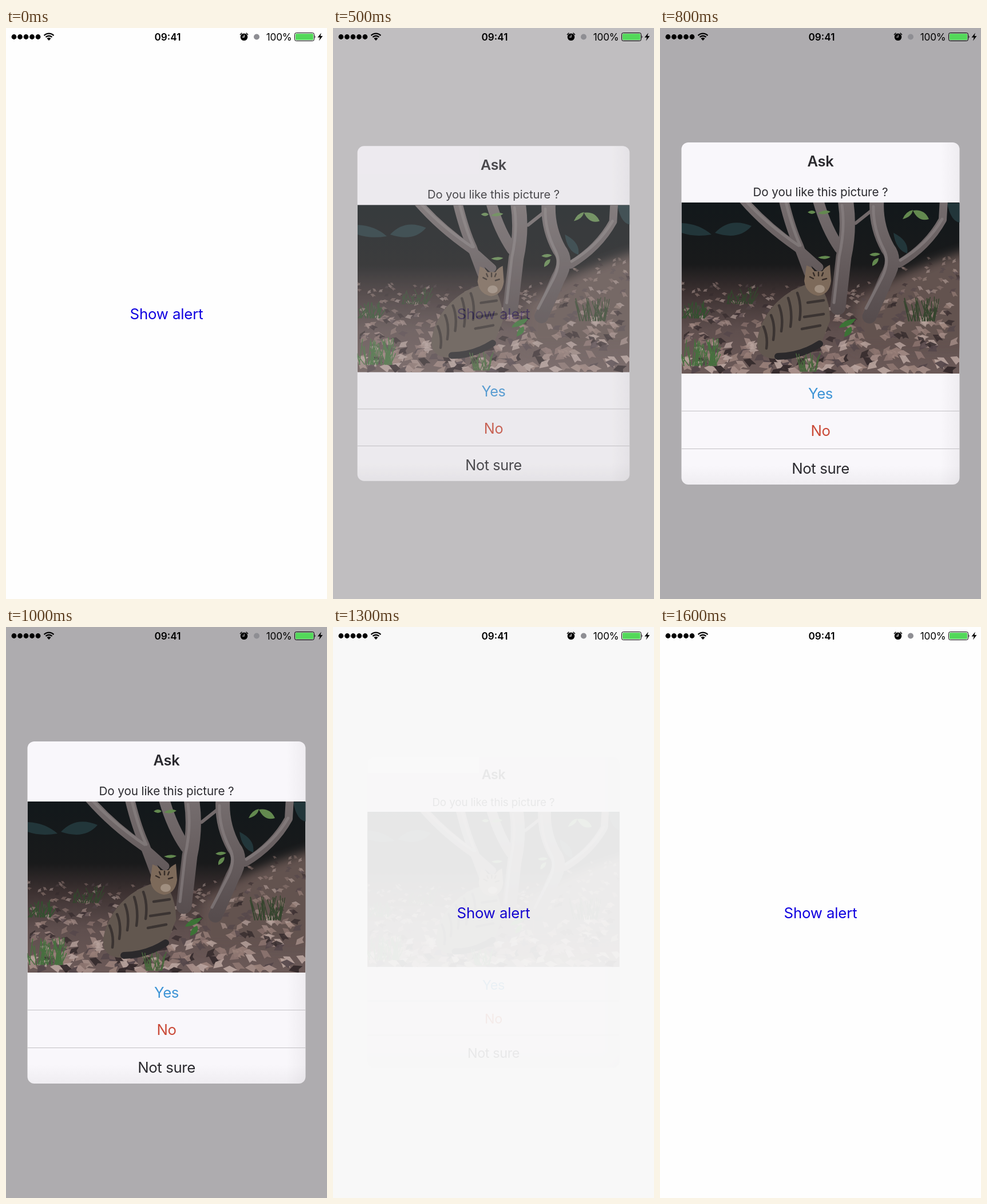
Animation of 561 by 998 pixels, one loop 2000 ms. Source, as an HTML page:

```html
<!DOCTYPE html>
<html lang="en">
<head>
<meta charset="utf-8">
<title>Alert</title>
<style>
  html, body { margin: 0; width: 100%; height: 100%; overflow: hidden; background: #fefefe; }
  svg { display: block; width: 100vw; height: 100vh; }
  text { font-family: Inter, Roboto, "Liberation Sans", sans-serif; }
  .action { font-size: 25.8px; letter-spacing: -.15px; text-anchor: middle; }
  #card .action { letter-spacing: -.4px; }
  .bar { font-size: 17.2px; }
  .line { fill: none; stroke-linecap: round; stroke-linejoin: round; }
</style>
</head>
<body>
<svg viewBox="0 0 561 998">
  <defs>
    <clipPath id="frame"><rect x="37.5" y="305" width="486" height="299"/></clipPath>
    <linearGradient id="scene" x1="0" y1="0" x2="0" y2="1">
      <stop offset="0" stop-color="#12181b"/>
      <stop offset=".36" stop-color="#191a1b"/>
      <stop offset=".52" stop-color="#3b3030"/>
      <stop offset=".75" stop-color="#5f4f4e"/>
      <stop offset="1" stop-color="#6c5a58"/>
    </linearGradient>
    <linearGradient id="bark" gradientUnits="userSpaceOnUse" x1="0" y1="305" x2="0" y2="510">
      <stop offset="0" stop-color="#756d6e"/>
      <stop offset="1" stop-color="#564c4d"/>
    </linearGradient>
    <linearGradient id="shade">
      <stop offset="0" stop-color="#1a141c" stop-opacity="0"/>
      <stop offset="1" stop-color="#1a141c" stop-opacity=".045"/>
    </linearGradient>
    <linearGradient id="shadeDown" href="#shade" x2="0" y2="1"/>
    <filter id="soft" x="-20%" y="-20%" width="140%" height="140%"><feGaussianBlur stdDeviation="9"/></filter>
    <mask id="clockFace">
      <rect x="405" y="5" width="22" height="22" fill="#fff"/>
      <path d="M416.2 12V15.9H413.4" class="line" stroke="#000" stroke-width="1.2"/>
    </mask>
  </defs>

  <rect width="561" height="998" fill="#fefefe"/>
  <text class="action" x="280.5" y="508.8" fill="#1000e0">Show alert</text>
  <rect id="dim" width="561" height="998" fill="#0c040e"/>

  <g id="card">
    <rect x="37.5" y="200" width="486" height="598" rx="12" fill="#f9f7fb"/>
    <path d="M490 200H511.5A12 12 0 0 1 523.5 212V786A12 12 0 0 1 511.5 798H490Z" fill="url(#shade)"/>
    <path d="M37.5 765H523.5V786A12 12 0 0 1 511.5 798H49.5A12 12 0 0 1 37.5 786Z" fill="url(#shadeDown)"/>
    <g fill="#2b2a2f" text-anchor="middle">
      <text x="280.5" y="242.3" font-size="25.5" font-weight="600" letter-spacing="-.3">Ask</text>
      <text x="280.5" y="293.5" font-size="20.7" letter-spacing="-.1">Do you like this picture ?</text>
    </g>
    <g clip-path="url(#frame)">
      <rect x="37.5" y="305" width="486" height="299" fill="url(#scene)"/>
      <path d="M340 480Q450 410 550 385V560H340Z" fill="#63524f" filter="url(#soft)"/>
      <g fill="#22363a">
        <path d="M38 341Q68 342 90 361Q60 366 38 358ZM96 358Q122 330 160 346Q138 372 96 358Z"/>
        <path d="M502 306H524V340Q508 338 502 306ZM408 358Q436 372 432 394Q412 388 408 358Z"/>
      </g>
      <g id="litter"></g>
      <g class="line" stroke="url(#bark)">
        <path d="M145 300Q185 346 240 384L278 418" stroke-width="15"/>
        <path d="M216 300Q228 350 242 380L260 428" stroke-width="17"/>
        <path d="M276 300Q290 350 314 385" stroke-width="19"/>
        <path d="M324 300Q332 350 321 400L311 488" stroke-width="27"/>
        <path d="M376 314L342 341" stroke-width="6"/>
        <path d="M379 300Q376 345 398 385Q414 405 396 436L366 504" stroke-width="25"/>
        <path d="M496 300L494 335Q468 382 418 412" stroke-width="14"/>
      </g>
      <g class="line" stroke="#8d8586" stroke-width="5" opacity=".6">
        <path d="M148 300Q187 343 242 380M219 300Q231 350 245 380M318 310Q324 350 313 400L304 480"/>
        <path d="M373 312Q372 350 391 387Q402 408 388 436L360 490M493 334Q468 377 420 406"/>
      </g>
      <g fill="#63894f">
        <path d="M442 319Q462 316 470 334Q452 340 442 319ZM424 334Q430 320 442 318Q440 330 424 334Z"/>
        <path d="M258 322Q266 316 272 322Q266 328 258 322ZM276 324Q288 316 298 321Q288 328 276 324Z"/>
        <path d="M366 396Q376 390 385 395Q374 402 366 396ZM371 416Q370 404 382 402Q382 412 371 416ZM276 401Q288 396 298 400Q288 407 276 401Z"/>
        <path d="M313 524Q318 510 342 508Q336 522 313 524ZM322 540Q322 526 334 522Q340 534 322 540Z" fill="#3c7236"/>
      </g>
      <path d="M258 448C214 460 176 500 170 546C168 570 184 579 206 578L250 573L284 546L297 512Q298 485 286 460Z" fill="#62574f"/>
      <g class="line" stroke="#3b3432" stroke-width="4.5">
        <path d="M240 463Q248 485 244 510M224 472Q232 495 228 522M208 485Q216 505 212 530M194 502Q202 520 198 545M181 522Q189 540 186 560"/>
        <path d="M258 480L286 476M252 505L286 500M248 526L280 520"/>
      </g>
      <path d="M206 574Q245 574 279 552" class="line" stroke="#2b292b" stroke-width="12"/>
      <path d="M252 442L256 415Q266 418 270 425H284Q288 418 297 414L299 442Q296 466 276 468Q255 464 252 442Z" fill="#7d6a5a"/>
      <path d="M262 435L268 438M284 440L291 438M268 428L270 433M277 427V433M285 428L283 433" class="line" stroke="#382e29" stroke-width="2.5"/>
      <ellipse cx="279" cy="456" rx="9" ry="7" fill="#a08f80"/>
      <g id="grass" class="line" stroke-width="1.5"></g>
    </g>
    <path d="M37.5 669.5H523.5M37.5 735.5H523.5" stroke="#c2c0c4"/>
    <text class="action" x="280.5" y="647.5" fill="#3d94d6">Yes</text>
    <text class="action" x="280.5" y="713.3" fill="#ca4a38">No</text>
    <text class="action" x="280.5" y="779" fill="#2b2a2f">Not sure</text>
  </g>

  <g id="status">
    <g id="signal"></g>
    <path d="M75 22L71.5 18.3Q75 15.4 78.5 18.3Z"/>
    <path d="M69.5 16A7.8 7.8 0 0 1 80.5 16M66.6 13.1A11.9 11.9 0 0 1 83.4 13.1" fill="none" stroke="#000" stroke-width="2.4"/>
    <text class="bar" x="282.5" y="21.7" text-anchor="middle" font-weight="600">09:41</text>
    <circle cx="416" cy="15.8" r="6.3" mask="url(#clockFace)"/>
    <path d="M409.4 11.4L412 8.9M420 8.9L422.6 11.4" class="line" stroke="#000" stroke-width="1.4"/>
    <circle cx="438" cy="15.5" r="5" fill="#8e8e93"/>
    <text class="bar" x="454.8" y="21.7" letter-spacing="-.2">100%</text>
    <rect x="504.5" y="8.5" width="34" height="14" rx="2.8" fill="none" stroke="#000"/>
    <rect x="506" y="10" width="31" height="11" rx="1.3" fill="#53d85a"/>
    <path d="M539.7 13Q541.6 15.5 539.7 18Z"/>
    <path d="M551 8.5L544.5 16.5H548.7L547 22.5L553.5 14H549.5Z"/>
  </g>
</svg>
<script>
const LOOP = 2000, STEP = 100, RATE = 0.0183;
const get = id => document.getElementById(id);

function add(parent, tag, attrs) {
  const node = document.createElementNS(parent.namespaceURI, tag);
  for (const name in attrs) node.setAttribute(name, attrs[name]);
  parent.appendChild(node);
}

let seed = 17;
function random(from, to) {
  seed = (seed * 16807) % 2147483647;
  return from + (to - from) * seed / 2147483647;
}

function drawSignal() {
  for (let i = 0; i < 5; i++) add(get("signal"), "circle", { cx: 14 + i * 10.5, cy: 15.5, r: 4.4 });
}

// Leaves grow larger and clearer towards the bottom of the picture.
function drawLeaves() {
  const tones = ["#a58d87", "#8d7570", "#b8a39d", "#9a817a", "#54464a", "#33292b"];
  const count = 420;
  for (let i = 0; i < count; i++) {
    const x = random(38, 523), near = i / count;
    const top = 445 - Math.max(0, x - 360) * 0.4;
    const y = top + (604 - top) * near, size = 4 + 9 * near;
    add(get("litter"), "path", {
      d: `M${-size} 0L${-size * 0.2} ${-size * 0.55}L${size} ${-size * 0.2}L${size * 0.4} ${size * 0.1}L${size * 0.3} ${size * 0.6}Z`,
      fill: tones[Math.floor(random(0, tones.length))],
      opacity: 0.45 + 0.5 * near,
      transform: `translate(${x} ${y}) rotate(${random(-50, 50)})`
    });
  }
}

function drawTuft(x, y, spread, height, color, blades) {
  let d = "";
  for (let i = 0; i < blades; i++) {
    const root = random(-spread, spread) * 0.7;
    d += `M${x + root} ${y}l${random(-0.4, 0.4) * spread} ${-random(0.4, 1) * height}`;
  }
  add(get("grass"), "path", { d, stroke: color });
}

// Share of the way still to go on a critically damped spring.
function remaining(ms) {
  const x = RATE * ms;
  return (1 + x) * Math.exp(-x);
}

function presence(t) {
  if (t < 500 || t >= 1500) return 0;
  if (t < 800) return 1 - remaining(t - 341);
  return t < 1300 ? 1 : remaining(t - 1065);
}

function render(time) {
  const t = Math.floor((time % LOOP) / STEP) * STEP;
  const shown = presence(t), scale = 0.9 + 0.1 * shown;
  get("dim").setAttribute("opacity", 0.33 * shown);
  get("card").setAttribute("opacity", shown);
  get("card").setAttribute("transform", `translate(280.5 499) scale(${scale}) translate(-280.5 -499)`);
}

drawSignal();
drawLeaves();
drawTuft(70, 590, 42, 48, "#47703f", 40);
drawTuft(62, 507, 34, 30, "#33502f", 22);
drawTuft(140, 482, 34, 30, "#33452d", 22);
drawTuft(255, 600, 26, 32, "#48663c", 22);
drawTuft(458, 512, 34, 42, "#36452e", 30);

const start = performance.now();
(function tick() {
  render(performance.now() - start);
  requestAnimationFrame(tick);
})();
</script>
</body>
</html>
```
